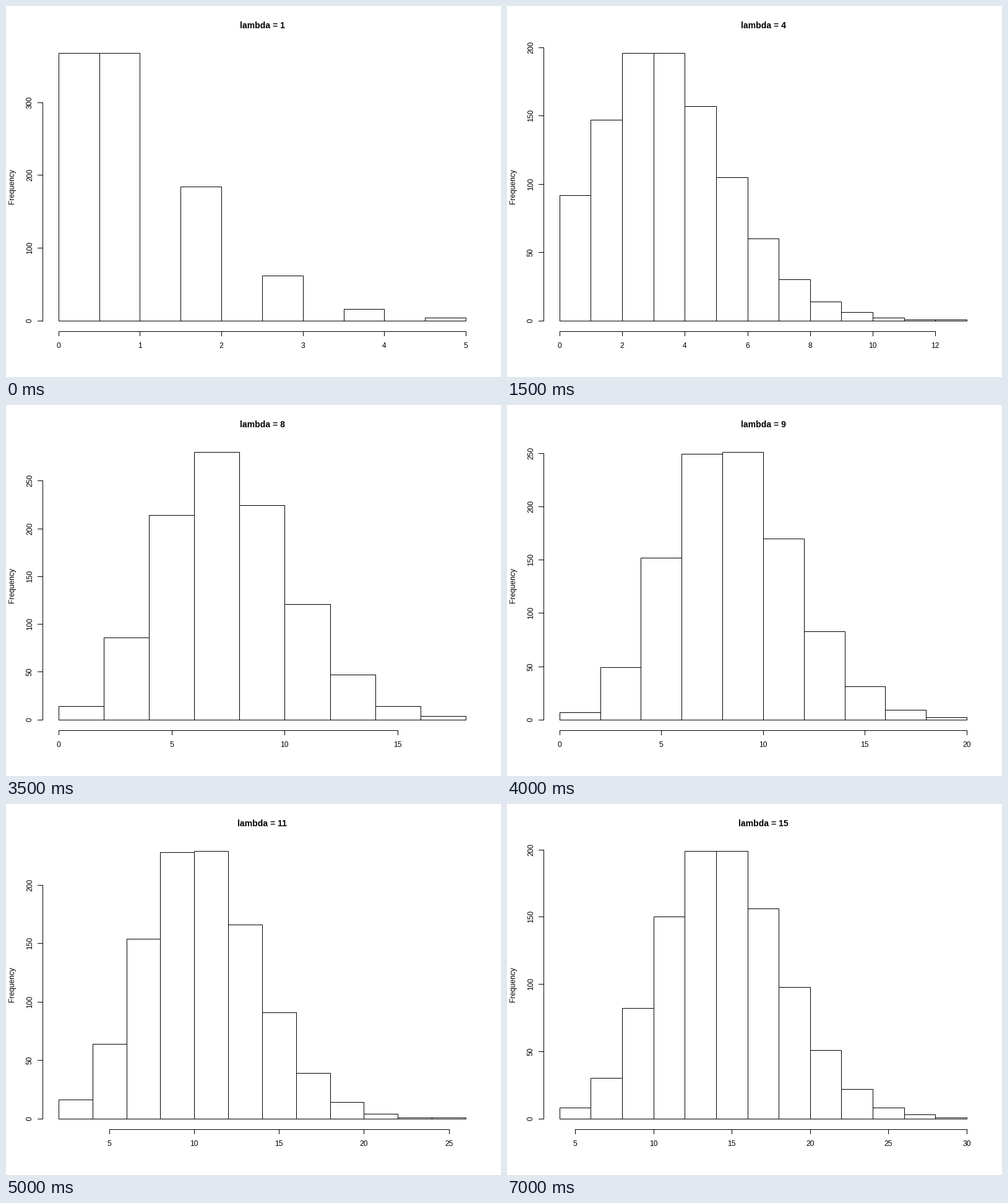
Recreate the animation shown at these times as a matplotlib script. Size 800 by 600 pixels, loop 7500 ms.

```python
from math import ceil, exp, factorial, floor, log10

import matplotlib.pyplot as plt
from matplotlib.animation import FuncAnimation

W, H, DPI = 800, 600, 100
PX = 72 / DPI                       # one pixel in points
LEFT, RIGHT = 85.36, 743.44         # x of the first and last break
BASE, TOP = 509.24, 76.36           # y of zero and of the tallest bar
AXIS_X, AXIS_Y, TICK = 59.04, 526.56, 7.2
DRAWS = 1000
# upper end of the range for lambda = 1, 2, ...
ENDS = [5, 8, 10, 13, 14, 18, 16, 18, 20, 24, 26, 26, 28, 30, 30]

plt.rcParams["font.family"] = "Liberation Sans"
fig = plt.figure(figsize=(W / DPI, H / DPI), dpi=DPI, facecolor="white")
ax = fig.add_axes([0, 0, 1, 1])


def prob(lam, first, last):
    """Poisson probability of first <= k <= last."""
    return sum(exp(-lam) * lam**k / factorial(k) for k in range(first, last + 1))


def histogram(lam):
    """Breaks and expected counts of DRAWS Poisson variates."""
    end = ENDS[lam - 1]
    step = 0.5 if end < 6 else 1 if end < 16 else 2
    low = 0
    while DRAWS * prob(lam, 0, low) < 1.1:
        low += 1
    start = low // step * step
    breaks = [start + i * step for i in range(round((end - start) / step) + 1)]
    counts = [ceil(DRAWS * prob(lam, floor(a) + 1 if a > start else 0, floor(b)))
              for a, b in zip(breaks, breaks[1:])]
    return breaks, counts


def ticks(lo, hi):
    """Round tick values inside the range widened by 4 % on each side."""
    pad = 0.04 * (hi - lo)
    lo, hi = lo - pad, hi + pad
    cell = (hi - lo) / 5
    base = 10 ** floor(log10(cell))
    unit = base
    for mult, bias in ((2, 0.8), (5, 1.7), (10, 0.8)):
        if mult * base - cell >= bias * (cell - unit):
            break
        unit = mult * base
    return [k * unit for k in range(ceil(lo / unit), floor(hi / unit) + 1)]


def line(*points):
    xs, ys = zip(*points)
    ax.plot([int(x) for x in xs], [int(y) for y in ys], color="black",
            lw=PX, solid_capstyle="projecting", solid_joinstyle="miter")


def label(x, y, text, size=12, **kw):
    ax.text(x, y, text, fontsize=size * PX, color="black", ha="center",
            va="baseline", rotation_mode="anchor", **kw)


def draw(i):
    lam = i + 1
    breaks, counts = histogram(lam)
    start, end, peak = breaks[0], breaks[-1], max(counts)

    def px(v):
        return LEFT + (RIGHT - LEFT) * (v - start) / (end - start)

    def py(v):
        return BASE - (BASE - TOP) * v / peak

    ax.clear()
    ax.set(xlim=(0, W), ylim=(H, 0))
    ax.axis("off")

    for a, b, n in zip(breaks, breaks[1:], counts):
        x0, x1, y = px(a), px(b), py(n)
        line((x0, BASE), (x0, y), (x1, y), (x1, BASE), (x0, BASE))

    xt, yt = ticks(start, end), ticks(0, peak)
    line((px(xt[0]), AXIS_Y), (px(xt[-1]), AXIS_Y))
    for v in xt:
        line((px(v), AXIS_Y), (px(v), AXIS_Y + TICK))
        label(int(px(v)), 553, f"{v:g}")

    line((AXIS_X, py(yt[0])), (AXIS_X, py(yt[-1])))
    for v in yt:
        line((AXIS_X, py(v)), (AXIS_X - TICK, py(v)))
        label(42, int(py(v)), f"{v:g}", rotation=90)

    label(13, 292, "Frequency", rotation=90)
    label(414, 36, f"lambda = {lam}", 14, weight="bold")
    return []


anim = FuncAnimation(fig, draw, frames=len(ENDS), interval=500,
                     init_func=lambda: [], repeat=True, repeat_delay=0)
plt.show()
```
